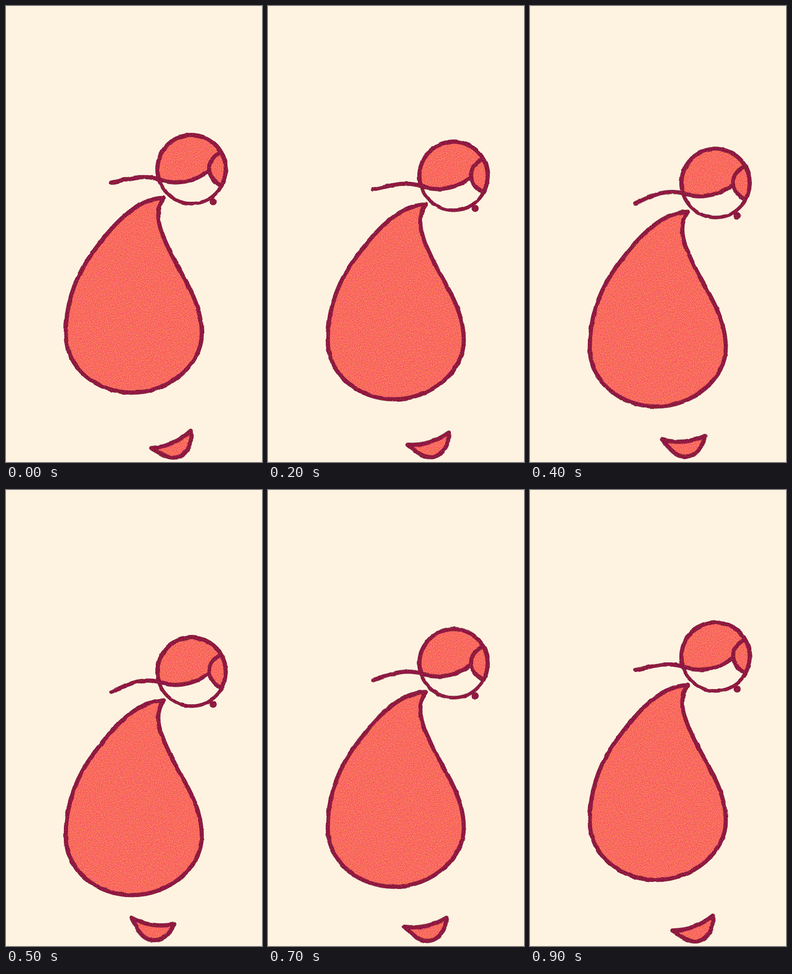
An HTML page for the animation above (1 s loop, 540 by 960 pixels).

```html
<!DOCTYPE html>
<html lang="en">
<head>
<meta charset="utf-8">
<title>Walking drop</title>
<style>
  html, body { margin: 0; width: 100%; height: 100%; overflow: hidden; background: #fef2e1; }
  svg { display: block; width: 100vw; height: 100vh; }
  .ink { fill: none; stroke: #8f1941; stroke-width: 8.8; stroke-linecap: round; stroke-linejoin: round; }
  .coral { fill: #f96b5f; }
  .dot { fill: #8f1941; }
</style>
</head>
<body>
<svg viewBox="0 0 540 960">
  <defs>
    <filter id="print" filterUnits="userSpaceOnUse" x="0" y="0" width="540" height="960" color-interpolation-filters="sRGB">
      <!-- uneven ink edge -->
      <feTurbulence type="fractalNoise" baseFrequency="0.07" numOctaves="1" seed="4"/>
      <feColorMatrix values="1 0 0 0 0  0 1 0 0 0  0 0 1 0 0  0 0 0 0 1" result="warp"/>
      <feDisplacementMap in="SourceGraphic" in2="warp" scale="4" xChannelSelector="R" yChannelSelector="G"/>
      <feGaussianBlur stdDeviation="0.5" result="shape"/>
      <!-- fine colour grain -->
      <feTurbulence type="fractalNoise" baseFrequency="0.6" numOctaves="2" seed="9"/>
      <feColorMatrix values="0.3 0 0 0 0.35  0 1 0 0 0  0 0 1 0 0  0 0 0 0 1" result="grain"/>
      <feComposite in="shape" in2="grain" operator="arithmetic" k1="0" k2="1" k3="0.7" k4="-0.35"/>
      <feComposite in2="shape" operator="in"/>
    </filter>
  </defs>
  <g filter="url(#print)">
    <rect width="540" height="960" fill="none"/>
    <g id="bird">
      <path class="ink coral" d="M333 404C270 404 213 475 173 533C139 585 126 640 126 690C126 765 195 814 265 814C345 814 413 755 413 690C413 620 368 565 344 513C328 478 308 438 333 404Z"/>
      <path class="coral" d="M321 363C350 376 395 374 428 346Q434 366 454 379A72 72 0 1 0 321 363Z"/>
      <circle class="ink" style="stroke-width:7.4" cx="391.5" cy="344" r="72"/>
      <path class="ink" d="M323 366A72 72 0 1 1 454 379"/>
      <path class="ink" d="M451 309C421 326 420 358 454 379"/>
      <path class="ink" id="tail"/>
      <circle class="dot" cx="437" cy="412" r="7.6"/>
    </g>
    <path class="ink coral" id="foot" d="M-45.5 0Q0 16 45.5 0C38 26 22 40 2 40C-18 40 -30 22 -45.5 0Z"/>
  </g>
</svg>
<script>
  const STEPS = 10, DURATION = 1000;

  // steady travel plus a late kick near the end of the swing
  const swing = (p, start, steady, kick) => start + steady * p + kick * p ** 5;

  const bird = p => ({ transform: `translate(0px, ${swing(p, 0, 35, 4)}px)` });

  const foot = p => ({
    transform: `translate(${swing(p, 348, -25, -13)}px, ${swing(p, 912.5, -4, -1)}px)
                rotate(${swing(p, -23.7, 17.7, 14.3)}deg)`
  });

  // the tail droops in the second half of the swing
  function tail(p) {
    const sag = Math.min(1, Math.max(0, 2.5 * p - 1));
    return { d: `path("M222 ${372 + 14 * sag}C262 ${364 + 4 * sag} 285 ${354 + 2 * sag} 324 365C350 376 395 374 428 346")` };
  }

  function play(id, pose) {
    const frames = [];
    for (let i = 0; i <= STEPS; i++) {
      const p = 1 - Math.abs(1 - 2 * i / STEPS);
      frames.push({ ...pose(p), offset: i / STEPS, easing: "steps(1, end)" });
    }
    document.getElementById(id).animate(frames, { duration: DURATION, iterations: Infinity }).startTime = 0;
  }

  play("bird", bird);
  play("tail", tail);
  play("foot", foot);
</script>
</body>
</html>
```
